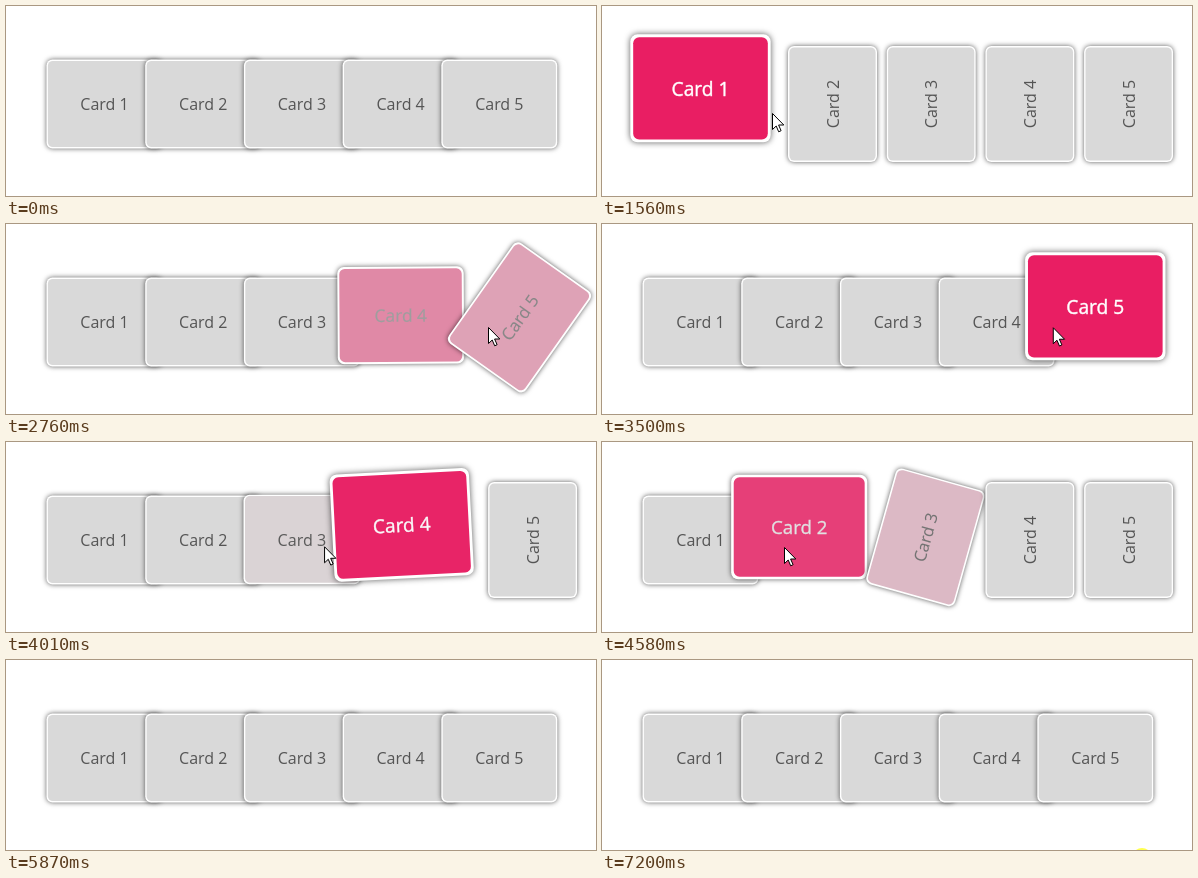
Animation of 590x190 px, one loop 7.3 s. Source, as an HTML page with a canvas:

```html
<!DOCTYPE html>
<html lang="en">
<head>
<meta charset="utf-8">
<title>Card fan</title>
<style>
  html, body { margin: 0; width: 100%; height: 100%; overflow: hidden; background: #fff; }
  canvas { display: block; }
</style>
</head>
<body>
<canvas id="stage" width="590" height="190"></canvas>
<script>
const ctx = document.getElementById('stage').getContext('2d');
const LOOP = 7300, DURATION = 400, CARDS = 5;
const WIDTH = 116, HEIGHT = 89;

// Key points of the pointer tip: [time, x, y]
const pointerPath = [
  [410, 100, 192], [800, 97, 106], [1200, 100, 104], [1560, 170, 107],
  [1950, 270, 105], [2030, 271, 104], [2250, 376, 103], [2700, 482, 103],
  [3380, 482, 103], [4360, 227, 105], [4580, 182, 105], [4880, 120, 112],
  [5270, 97, 133], [5310, 96, 139], [5870, 88, 194]
];

const mix = (a, b, p) => a + (b - a) * p;
const mixColor = (a, b, p) => `rgb(${a.map((v, i) => Math.round(mix(v, b[i], p)))})`;
const bezier = (a, b, s) => 3 * a * s * (1 - s) ** 2 + 3 * b * s * s * (1 - s) + s ** 3;

// CSS "ease"
function ease(x) {
  if (x <= 0) return 0;
  if (x >= 1) return 1;
  let low = 0, high = 1;
  for (let i = 0; i < 20; i++) {
    const mid = (low + high) / 2;
    if (bezier(0.25, 0.25, mid) < x) low = mid; else high = mid;
  }
  return bezier(0.1, 1, low);
}

function pointerAt(time) {
  const next = pointerPath.findIndex(point => point[0] > time);
  if (next < 1) return null;
  const [t0, x0, y0] = pointerPath[next - 1], [t1, x1, y1] = pointerPath[next];
  const p = (time - t0) / (t1 - t0);
  return { x: mix(x0, x1, p), y: mix(y0, y1, p) };
}

const poses = {
  rest: { lift: 0, turn: 0 },
  lifted: { lift: 1, turn: 0 },
  turned: { lift: 0, turn: 1 }
};

function poseName(card, hovered) {
  if (card === hovered) return 'lifted';
  return hovered >= 0 && card > hovered ? 'turned' : 'rest';
}

const hovers = []; // { start, hovered }, -1 = none

// Replays the transitions; a reversed one is shortened, as in CSS.
function poseAt(card, time) {
  let step = { start: 0, from: poses.rest, name: 'rest', previous: '', length: DURATION };
  const progress = t => ease((t - step.start) / step.length);
  const sample = t => {
    const p = progress(t), to = poses[step.name];
    return { lift: mix(step.from.lift, to.lift, p), turn: mix(step.from.turn, to.turn, p) };
  };
  for (const { start, hovered } of hovers) {
    if (start > time) break;
    const name = poseName(card, hovered);
    if (name === step.name) continue;
    const length = name === step.previous ? DURATION * progress(start) : DURATION;
    step = { start, from: sample(start), name, previous: step.name, length };
  }
  return sample(time);
}

function placeAt(card, time) {
  const { lift, turn } = poseAt(card, time);
  return {
    lift,
    x: 98.5 + 98.7 * card + 33.3 * turn,
    y: 98 - 15.7 * lift,
    angle: -turn * Math.PI / 2,
    scale: 1 + 0.2 * lift,
    width: WIDTH + lift,
    height: HEIGHT + lift
  };
}

function isInside(point, place) {
  const dx = (point.x - place.x) / place.scale, dy = (point.y - place.y) / place.scale;
  const cos = Math.cos(place.angle), sin = Math.sin(place.angle);
  return Math.abs(dx * cos + dy * sin) < place.width / 2
    && Math.abs(dy * cos - dx * sin) < place.height / 2;
}

function cardUnder(point, time) {
  for (let card = CARDS - 1; point && card >= 0; card--) {
    if (isInside(point, placeAt(card, time))) return card;
  }
  return -1;
}

// Follow the pointer once through the loop to learn when each card is hovered.
for (let time = 0, last = -1; time < LOOP; time += 10) {
  const hovered = cardUnder(pointerAt(time), time);
  if (hovered !== last) hovers.push({ start: time, hovered });
  last = hovered;
}

function box(width, height, radius) {
  ctx.beginPath();
  ctx.roundRect(-width / 2, -height / 2, width, height, radius);
  ctx.fill();
}

function drawCard(card, time) {
  const { x, y, angle, scale, lift, width, height } = placeAt(card, time);
  const border = mix(1.4, 2.4, lift);
  const label = `Card ${card + 1}`;
  ctx.save();
  ctx.translate(x, y);
  ctx.rotate(angle);
  ctx.scale(scale, scale);
  ctx.shadowColor = 'rgba(0, 0, 0, 0.65)';
  ctx.shadowBlur = 5 * scale;
  ctx.fillStyle = '#fff';
  box(width, height, 6);
  ctx.shadowColor = 'transparent';
  ctx.fillStyle = mixColor([217, 217, 217], [233, 30, 99], lift);
  box(width - 2 * border, height - 2 * border, 5);
  ctx.fillStyle = ctx.strokeStyle = mixColor([85, 85, 85], [255, 255, 255], lift);
  ctx.font = '16px "Open Sans", sans-serif';
  ctx.textAlign = 'center';
  ctx.fillText(label, 0, 6);
  if (lift > 0) {
    ctx.lineWidth = 0.35 * lift;
    ctx.strokeText(label, 0, 6);
  }
  ctx.restore();
}

const arrow = new Path2D('M0 0V16L3.7 12.5L6.2 18.3L8.6 17.2L6.1 11.5H11.3Z');

function drawPointer(point) {
  ctx.save();
  ctx.translate(point.x + 0.5, point.y + 0.5);
  ctx.fillStyle = '#fff';
  ctx.strokeStyle = '#000';
  ctx.lineWidth = 1;
  ctx.fill(arrow);
  ctx.stroke(arrow);
  ctx.restore();
}

function drawGlow() {
  ctx.fillStyle = '#ffff50';
  ctx.beginPath();
  ctx.arc(540, 198, 10, 0, 2 * Math.PI);
  ctx.fill();
}

function draw(time) {
  const pointer = pointerAt(time);
  ctx.fillStyle = '#fff';
  ctx.fillRect(0, 0, 590, 190);
  for (let card = 0; card < CARDS; card++) drawCard(card, time);
  if (pointer) drawPointer(pointer);
  if (time >= 7200) drawGlow();
}

let origin;
function frame(now) {
  origin ??= now;
  draw((now - origin) % LOOP);
  requestAnimationFrame(frame);
}
requestAnimationFrame(frame);
</script>
</body>
</html>
```
